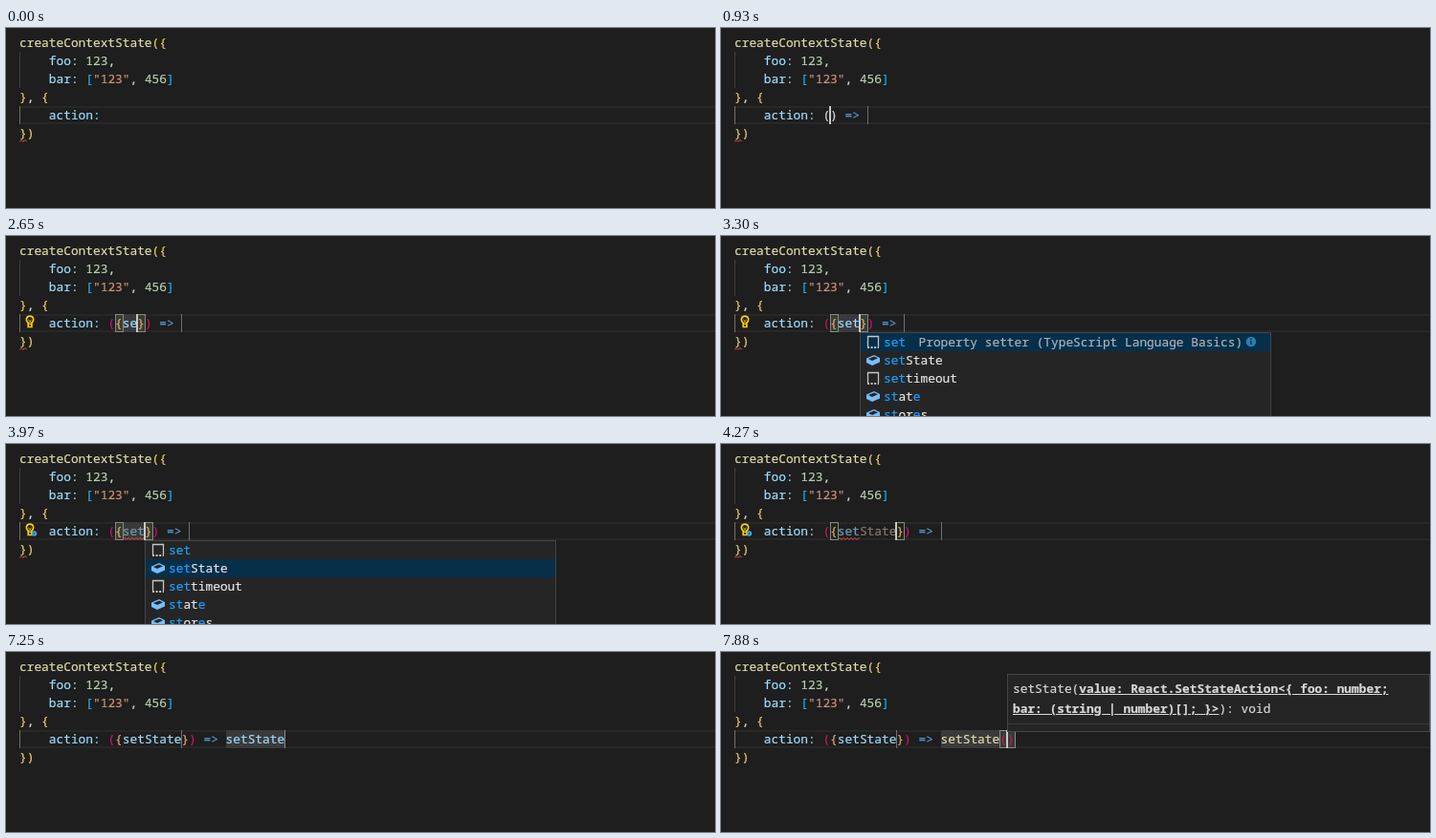
Write an HTML page that moves like this. It is 741 px wide and 189 px high and loops after 8000 ms.

```html
<!DOCTYPE html>
<html lang="en">
<head>
<meta charset="utf-8">
<title>Code editor</title>
<style>
html, body { margin: 0; width: 100%; height: 100%; overflow: hidden; background: #1e1e1e; }
#stage { position: relative; width: 741px; height: 189px; overflow: hidden; background: #1e1e1e;
  font: 12.83px/19px "Noto Sans Mono", "DejaVu Sans Mono", monospace; color: #d8d8d8;
  -webkit-text-stroke: .2px; }
#stage div, #stage svg { position: absolute; white-space: pre; box-sizing: border-box; }
.line { left: 14px; height: 19px; }
.current { left: 14px; right: 0; top: 82px; height: 19px; border: solid #282828; border-width: 2px 0; }
.guide { left: 14px; width: 1px; background: #404040; }
.fn { color: #dcdcaa; } .id { color: #9cdcfe; } .num { color: #b5cea8; } .str { color: #ce9178; }
.b1 { color: #ecce62; } .b2 { color: #cf1066; } .b3 { color: #f0a56c; } .sq { color: #1cb0f2; }
.kw { color: #569cd6; } .dim { color: #729db3; } .raw { color: #8d7766; }
.box { top: 82px; width: 9px; height: 19px; border: 1px solid #888; background: rgba(0, 100, 0, .1); }
.stop { top: 82px; width: 1px; height: 19px; background: #707070; }
.fill { top: 82px; height: 19px; background: #3a3a3a; }
.cursor { top: 82px; width: 2px; height: 19px; background: #c8c9c7; }
.list { left: 145px; top: 101px; width: 430px; height: 120px; background: #252526; border: 1px solid #454545; }
.row { left: 0; width: 428px; height: 19px; padding-left: 24px; color: #e4e4e4; }
.row.on { background: #062f4a; }
.row b { font-weight: normal; color: #18a3ff; }
.row i { font-style: normal; color: #a9b4bb; margin-left: 13.4px; }
.row svg { left: 6px; top: 2px; }
.row svg.info { left: 402px; top: 3px; }
.hint { left: 299px; top: 23px; width: 442px; height: 61px; background: #252526; border: 1px solid #454545; }
.hint p { position: absolute; left: 5px; top: 4px; margin: 0; line-height: 21px; }
.hint b { text-decoration: underline; }
.hint hr { position: absolute; left: 0; right: 0; bottom: 7px; margin: 0; border: 0; border-top: 1px solid #3c3c3d; }
</style>
</head>
<body>
<div id="stage">
  <div class="current"></div>
  <div class="guide" style="top:25px;height:38px"></div>
  <div class="guide" style="top:82px;height:19px;background:#707070"></div>
  <div id="under"></div>
  <div class="line" style="top:6px"><span class="fn">createContextState</span><span class="b1">({</span>
    <span class="id">foo:</span> <span class="num">123</span>,
    <span class="id">bar:</span> <span class="sq">[</span><span class="str">"123"</span>, <span class="num">456</span><span class="sq">]</span>
<span class="b1">}</span>, <span class="b1">{</span></div>
  <div class="line" id="code" style="top:82px"></div>
  <div class="line b1" style="top:101px">})</div>
  <div id="over"></div>
</div>
<script>
const LOOP = 8000;
const $ = id => document.getElementById(id);
const colX = c => 14 + 7.7 * c;
const snapX = c => Math.round(colX(c));
const span = (cls, text) => `<span class="${cls}">${text}</span>`;
const at = (cls, x, extra = '') => `<div class="${cls}" style="left:${x}px;${extra}"></div>`;
const fill = (col, count) => at('fill', colX(col), `width:${7.7 * count}px`);
const svg = (x, y, w, h, body) =>
  `<svg style="left:${x}px;top:${y}px" width="${w}" height="${h}" fill="none">${body}</svg>`;

function squiggle(x, y, w) {
  let d = 'M0 2.5';
  for (let i = 1; i * 2 <= w + 1; i++) d += `L${i * 2} ${i % 2 ? 0.5 : 2.5}`;
  return svg(x, y, w, 3, `<path d="${d}" stroke="#f14c4c"/>`);
}

function bulb(kind) {
  const mark = kind === 'fix' ? '<circle cx="9.5" cy="11" r="2.7" fill="#3fa9e8"/><circle cx="9.5" cy="11" r=".8" fill="#1e1e1e"/>' : '';
  return svg(20, 83, 13, 15,
    '<path d="M3.2 8.2C-.2 5 1.6 1.2 5 1.2S10.2 5 6.9 8.2V12.5H3.2Z" stroke="#ffcc00" stroke-width="1.7"/>' +
    '<path d="M3 9.6H7M3.4 5L5 6.5L6.6 5M5 6.5V9" stroke="#ffcc00"/>' + mark);
}

const snippetIcon = '<svg width="14" height="15" fill="none"><path d="M1.5 12V1.5H12.5V12" stroke="#c5c5c5" stroke-width="1.3"/><path d="M1 13H13" stroke="#c5c5c5" stroke-width="2" stroke-dasharray="2 1.6"/></svg>';
const cubeIcon = '<svg width="15" height="15"><path d="M0 5.5L8 2L14 5V9.5L6 13L0 10Z" fill="#75beff"/><path d="M2 6L8 3.4L12 5.3L6 8Z" fill="#252526"/></svg>';
const infoIcon = '<svg class="info" width="12" height="12"><circle cx="6" cy="6" r="5.2" fill="#2d7fb0"/><path d="M6 5V9M6 2.6V4" stroke="#062f4a" stroke-width="1.4"/></svg>';
const rows = [
  [snippetIcon, '<b>set</b>', '<i>Property setter (TypeScript Language Basics)</i>' + infoIcon],
  [cubeIcon, '<b>set</b>State'],
  [snippetIcon, '<b>set</b>timeout'],
  [cubeIcon, '<b>st</b>at<b>e</b>'],
  [cubeIcon, '<b>st</b>or<b>e</b>s']
];

const list = picked => '<div class="list">' + rows.map(([icon, label, detail = ''], i) =>
  `<div class="row${i === picked ? ' on' : ''}" style="top:${i * 19}px">${icon}${label}${i === picked ? detail : ''}</div>`).join('') + '</div>';

const hint = '<div class="hint"><p>setState(<b>value: React.SetStateAction&lt;{ foo: number;</b>\n' +
  '<b>bar: (string | number)[]; }&gt;</b>): void</p><hr></div>';

// Each step changes part of the editor state; cursor and boxes are columns.
const steps = [
  [0, { pre: '', arrow: false, brace: false, arg: '', argCls: 'id', body: '', call: false, cursor: 12, on: false,
        boxes: [], err: true, bulb: '', wave: false, pick: -1, stop: 0, argFill: false, fill: false, edge: false,
        hint: false, plain: false }],
  [30, { on: true }],
  [450, { pre: 'a', cursor: 13 }],
  [630, { pre: 'af', cursor: 14 }],
  [890, { pre: '', arrow: true, plain: true, cursor: 13 }],
  [960, { stop: 13 }],
  [1030, { plain: false }],
  [1090, { boxes: [12, 13] }],
  [1160, { err: false }],
  [1450, { on: false }],
  [1520, { err: true }],
  [1590, { bulb: 'plain' }],
  [1940, { on: true }],
  [2370, { brace: true, argFill: true, cursor: 14, stop: 0, boxes: [] }],
  [2440, { boxes: [13, 14] }],
  [2520, { arg: 's', cursor: 15, boxes: [13, 15] }],
  [2650, { arg: 'se', cursor: 16, boxes: [13, 16] }],
  [2840, { arg: 'set', cursor: 17, boxes: [13] }],
  [2920, { boxes: [13, 17] }],
  [3300, { pick: 0 }],
  [3360, { on: false }],
  [3460, { wave: true, argCls: 'dim' }],
  [3670, { bulb: 'fix' }],
  [3920, { on: true }],
  [3970, { pick: 1 }],
  [4270, { arg: 'setState', argCls: 'half', argFill: false, cursor: 22, stop: 22, boxes: [13, 22], pick: -1 }],
  [4290, { argCls: 'dim' }],
  [4530, { bulb: '' }],
  [4710, { wave: false }],
  [4750, { on: false }],
  [4960, { cursor: 28, on: true, boxes: [] }],
  [5090, { bulb: 'plain' }],
  [5270, { bulb: '' }],
  [5450, { body: 's', cursor: 29 }],
  [5530, { fill: true }],
  [5620, { body: 'se', cursor: 30 }],
  [5800, { body: 'set', cursor: 31 }],
  [6180, { body: 'setS', cursor: 32 }],
  [6260, { err: false }],
  [6410, { body: 'setSt', cursor: 33 }],
  [6540, { body: 'setSta', cursor: 34 }],
  [6690, { body: 'setStat', cursor: 35 }],
  [6790, { body: 'setState', cursor: 36 }],
  [7250, { on: false, edge: true, argCls: 'id' }],
  [7710, { call: true, cursor: 37, on: true, edge: false }],
  [7770, { boxes: [36, 37] }],
  [7820, { hint: true }]
];

let state = {};
const states = steps.map(([t, change]) => ({ t, ...(state = { ...state, ...change }) }));

function codeLine(s) {
  let out = '    ' + span('id', 'action:') + ' ' + span('id', s.pre);
  if (!s.arrow) return out;
  const paren = s.plain ? '' : 'b2';
  const arg = s.argCls === 'half'
    ? span('dim', s.arg.slice(0, 3)) + span('raw', s.arg.slice(3))
    : span(s.argCls, s.arg);
  out += span(paren, '(');
  if (s.brace) out += span('b3', '{') + arg + span('b3', '}');
  out += span(paren, ')') + ' ' + span('kw', '=&gt;') + ' ';
  out += span(s.call ? 'fn' : 'id', s.body);
  return out + (s.call ? span('b2', '()') : '');
}

function draw(s) {
  const end = 18 + (s.brace ? 2 + s.arg.length : 0);
  let under = '', over = '';
  if (s.argFill) under += fill(13, s.arg.length + 2);
  if (s.fill) under += fill(end, s.body.length + (s.call ? 2 : 0));
  if (s.stop) under += at('stop', snapX(s.stop));
  if (s.arrow && !s.body) under += at('stop', snapX(end));
  for (const c of s.boxes) under += at('box', snapX(c));
  if (s.bulb) over += bulb(s.bulb);
  if (s.wave) over += squiggle(122, 98, 23);
  if (s.err) over += squiggle(14, 117, 8);
  if (s.edge) over += at('stop', snapX(36), 'background:#8a8a8a');
  if (s.on) over += at('cursor', snapX(s.cursor) - 1);
  if (s.pick >= 0) over += list(s.pick);
  if (s.hint) over += hint;
  $('under').innerHTML = under;
  $('code').innerHTML = codeLine(s);
  $('over').innerHTML = over;
}

let shown = null;
function tick() {
  const t = performance.now() % LOOP;
  const next = states.filter(s => s.t <= t).pop();
  if (next !== shown) draw(shown = next);
  requestAnimationFrame(tick);
}
tick();
</script>
</body>
</html>
```
